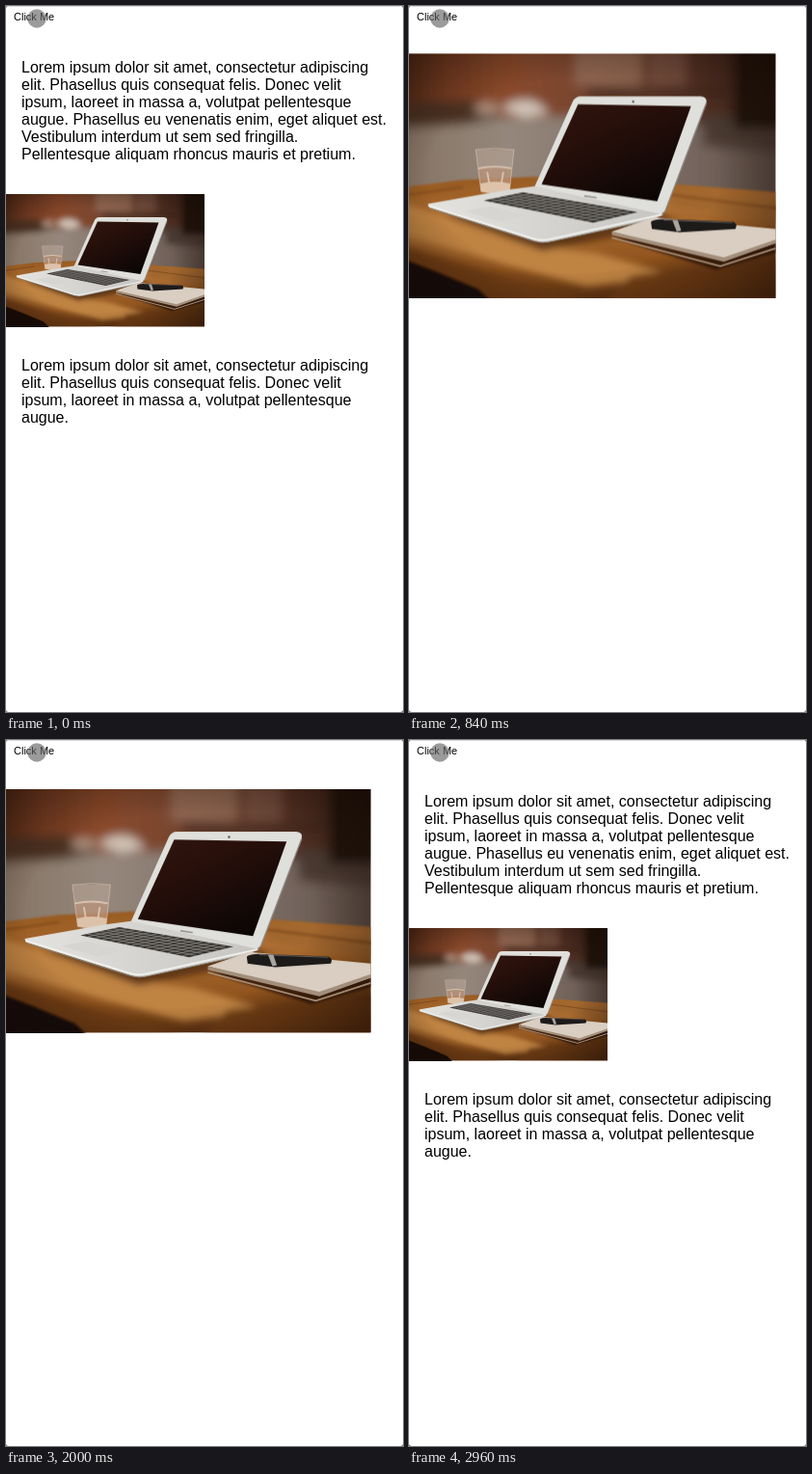
Write an HTML page that moves like this. It is 412 px wide and 732 px high and loops after 3000 ms.

```html
<!DOCTYPE html>
<html lang="en">
<head>
<meta charset="utf-8">
<title>Image transition</title>
<style>
html, body { margin: 0; width: 100%; height: 100%; overflow: hidden; background: #fff; }
svg { display: block; }
text { font: 16px "Liberation Sans", Arial, sans-serif; white-space: pre; }
.label { font-size: 11px; }
</style>
</head>
<body>
<svg width="412" height="732" viewBox="0 0 412 732">
  <defs>
    <filter id="soft" x="-10%" y="-10%" width="120%" height="120%"><feGaussianBlur stdDeviation="6"/></filter>
    <filter id="grain" x="-10%" y="-10%" width="120%" height="120%"><feGaussianBlur stdDeviation="4"/></filter>
    <filter id="fine" x="-10%" y="-10%" width="120%" height="120%"><feGaussianBlur stdDeviation="1.2"/></filter>
    <linearGradient id="wall">
      <stop offset="0" stop-color="#4a2817"/><stop offset=".15" stop-color="#7a3f24"/>
      <stop offset=".3" stop-color="#8a4a2c"/><stop offset=".5" stop-color="#744430"/>
      <stop offset=".8" stop-color="#553226"/><stop offset="1" stop-color="#241612"/>
    </linearGradient>
    <linearGradient id="street">
      <stop offset="0" stop-color="#82705f"/><stop offset=".3" stop-color="#95877c"/>
      <stop offset=".75" stop-color="#74655d"/><stop offset="1" stop-color="#54443c"/>
    </linearGradient>
    <linearGradient id="wood" x1="0" y1="0" x2=".2" y2="1">
      <stop offset="0" stop-color="#94571f"/><stop offset=".35" stop-color="#ad6f33"/>
      <stop offset=".65" stop-color="#935620"/><stop offset="1" stop-color="#532b0e"/>
    </linearGradient>
    <linearGradient id="screen" x1="0" y1="0" x2=".7" y2="1">
      <stop offset="0" stop-color="#301610"/><stop offset=".35" stop-color="#29100b"/>
      <stop offset="1" stop-color="#0b0605"/>
    </linearGradient>
    <linearGradient id="deck"><stop offset="0" stop-color="#e4e3df"/><stop offset="1" stop-color="#c6c5c1"/></linearGradient>
    <radialGradient id="vignette" cx=".45" cy=".5" r=".72">
      <stop offset=".55" stop-color="#140803" stop-opacity="0"/>
      <stop offset="1" stop-color="#140803" stop-opacity=".6"/>
    </radialGradient>
  </defs>

  <rect width="412" height="732" fill="#777"/>
  <rect width="412" height="732" rx="3" fill="#fff"/>
  <rect x="3" width="406" height="1" fill="#d9d9d9"/>

  <g id="texts"></g>

  <svg id="photo" viewBox="0 0 412 275" preserveAspectRatio="none">
    <g filter="url(#soft)">
      <rect x="-30" y="-30" width="472" height="130" fill="url(#wall)"/>
      <path d="M-30 76L200 70 442 88V200H-30Z" fill="url(#street)"/>
      <path d="M-30 56L70 52 104 72 60 80-30 84Z" fill="#4b3024"/>
      <path d="M104 62Q120 48 142 54L158 66 130 72Z" fill="#d2c4b8"/>
      <ellipse cx="88" cy="62" rx="14" ry="7" fill="#a98b79"/>
      <path d="M186 -10H262V36H186Z" fill="#8c6450"/>
      <path d="M200 38H360V50H200Z" fill="#4c2d22"/>
      <path d="M270 -10H312V36H270Z" fill="#785140"/>
      <path d="M330 66L430 78V112L330 104Z" fill="#4d3d36"/>
      <rect x="366" y="-20" width="70" height="104" fill="#211511"/>
    </g>
    <g filter="url(#fine)">
      <path d="M-20 152L60 142 150 138 300 147 432 157V300H-20Z" fill="url(#wood)"/>
    </g>
    <g filter="url(#grain)">
      <path d="M-20 165L30 180 140 216 210 224 300 250 200 262 110 238-20 200Z" fill="#bf8342"/>
      <path d="M300 152L430 170V190L296 172Z" fill="#a0662d"/>
      <path d="M-20 212L60 236 130 258 240 290H-20Z" fill="#754016"/>
      <path d="M250 250L430 226V300H200Z" fill="#744014"/>
      <path d="M40 182L150 222 240 204 300 186 270 178Z" fill="#4f2a12" opacity=".8"/>
    </g>
    <g filter="url(#fine)">
      <path d="M-20 226L30 245 78 265 104 290H-20Z" fill="#170c08"/>
      <path d="M290 158L430 176M-10 160L60 150" stroke="#6f3e18" stroke-width="2" opacity=".6"/>
      <path d="M230 207L345 243 412 224V212Z" fill="#43230f"/>
    </g>
    <rect width="412" height="275" fill="url(#vignette)"/>

    <path d="M75 108H118L113 155Q97 159 81 155Z" fill="#d8c2b4" opacity=".3"/>
    <path d="M77 128Q97 124 116 128L113 155Q97 159 81 155Z" fill="#b58e74" opacity=".65"/>
    <path d="M80 146Q97 142 114 146L113 154Q97 158 81 155Z" fill="#f0dcc8" opacity=".7"/>
    <path d="M75 108Q97 105 118 108L113 155Q97 159 81 155Z" fill="none" stroke="#e0cabb" opacity=".6"/>
    <path d="M78 129Q97 125 115 129M88 133L90 145M106 133L104 145" fill="none" stroke="#f5e4d6" stroke-width="2" opacity=".6"/>

    <path d="M141 150L184 54Q187 48 193 48L328 48Q336 49 334 56L288 177 283 182Z" fill="#dfdfdb"/>
    <path d="M334 56L288 177 283 182" fill="none" stroke="#8c8682" stroke-width="1.5"/>
    <path d="M190 57L317 59 279 166 149 147Z" fill="url(#screen)"/>
    <circle cx="252" cy="54" r="1.3" fill="#555"/>
    <path d="M197 160L211 162" stroke="#8c8a87" stroke-width="1.5"/>
    <path d="M21 169L112 153 141 149 286 181 272 187 161 211Q150 214 140 210L23 173Z" fill="url(#deck)"/>
    <path d="M22 171L140 208Q150 211 161 208L284 181" fill="none" stroke="#f1f1ed" stroke-width="2"/>
    <path d="M24 174L140 211Q150 214 161 211L280 185" fill="none" stroke="#85817b"/>
    <path d="M63 177L92 172 133 182 103 189Z" fill="#d6d5d1"/>
    <path d="M84 165L128 156 257 178 207 190Z" fill="#35322f"/>
    <path id="keys" fill="none" stroke="#aaa8a3" stroke-width=".6"/>

    <path d="M228 200L275 184 412 197V213L354 233Z" fill="#d9cec1"/>
    <path d="M228 200L354 229 412 209V213L354 234 228 204Z" fill="#a28e7b"/>
    <path d="M228 207L350 239 412 219" fill="none" stroke="#a98f76" stroke-width="2"/>
    <path d="M272 189Q276 186 286 186L364 189Q370 191 367 197L304 201 273 197Z" fill="#1d1a1a"/>
    <path d="M286 187L364 190" stroke="#66605b"/>
    <path d="M296 187L302 187 306 199 301 200Z" fill="#aaa49e"/>
  </svg>

  <text class="label" x="8" y="15">Click Me</text>
  <circle id="touch" cx="32" cy="13" r="9.7" fill="#666" fill-opacity=".65"/>
  <g id="press">
    <circle cx="32" cy="12.5" r="22" fill="none" stroke="#111" stroke-width="1.8"/>
    <path d="M32 12V26.5L35.2 23.5 37.6 29 40 28 37.6 22.6H42Z" fill="#000" stroke="#fff"/>
  </g>
</svg>

<script>
const LOOP = 3000, STEP = 250;
const $ = id => document.getElementById(id);

const lines = [
  'Lorem ipsum dolor sit amet, consectetur adipiscing',
  'elit. Phasellus quis consequat felis. Donec velit',
  'ipsum, laoreet in massa a, volutpat pellentesque',
  'augue. Phasellus eu venenatis enim, eget aliquet est.',
  'Vestibulum interdum ut sem sed fringilla.',
  'Pellentesque aliquam rhoncus mauris et pretium.',
  'Pellentesque vehicula malesuada risus, ut laoreet',
  'lectus dignissim vel. Suspendisse vel ex id tortor',
  'tincidunt rhoncus. In tempor commodo sapien',
  'placerat auctor. Maecenas sollicitudin augue massa.',
  'Quisque facilisis dui quis risus tempor euismod',
  'pharetra ut leo. Fusce sit amet dui at nisi facilisis',
  'lobortis ut ut est. Morbi a arcu eget nibh aliquam',
  'maximus sed quis ex.'
];

const paragraph = (top, rows) => rows.map((row, i) =>
  `<text x="16" y="${top + 14 + 18 * i}">${row}</text>`).join('');

$('texts').innerHTML =
  `<g id="compact">${paragraph(55, lines.slice(0, 6))}${paragraph(364, [...lines.slice(0, 3), 'augue.'])}</g>` +
  `<g id="expanded">${paragraph(330, lines)}</g>`;

// Gaps between the keys, spread over the keyboard's four corners
const keyPoint = (u, v) => {
  const x = 84 + 44 * v + u * (123 + 6 * v);
  const y = 165 - 9 * v + u * (25 - 3 * v);
  return x.toFixed(1) + ' ' + y.toFixed(1);
};
let grid = '';
for (let i = 1; i < 6; i++) grid += `M${keyPoint(0, i / 6)}L${keyPoint(1, i / 6)}`;
for (let i = 1; i < 15; i++) grid += `M${keyPoint(i / 15, 0)}L${keyPoint(i / 15, 1)}`;
$('keys').setAttribute('d', grid);

const bezier = (x1, y1, x2, y2) => x => {
  if (x <= 0 || x >= 1) return x <= 0 ? 0 : 1;
  const at = (a, b, s) => 3 * a * s * (1 - s) ** 2 + 3 * b * s * s * (1 - s) + s ** 3;
  let lo = 0, hi = 1;
  for (let i = 0; i < 24; i++) {
    const mid = (lo + hi) / 2;
    if (at(x1, x2, mid) < x) lo = mid; else hi = mid;
  }
  return at(y1, y2, lo);
};
const ease = bezier(.25, .1, .25, 1);
const easeInOut = bezier(.42, 0, .58, 1);

function draw(t) {
  const phase = (start, curve) => curve((t - start) / STEP);
  const grow = phase(659, easeInOut) - phase(1931, easeInOut);
  const width = 206 * (1 + grow);
  const photo = $('photo');
  photo.setAttribute('y', 195 - 172 * grow);
  photo.setAttribute('width', width);
  photo.setAttribute('height', width * 2 / 3);

  $('compact').setAttribute('opacity', 1 - phase(402, ease) + phase(2186, ease));
  $('expanded').setAttribute('opacity', phase(912, ease) - phase(1670, ease));

  const pressed = (t >= 240 && t < 400) || (t >= 1510 && t < 1660);
  $('press').setAttribute('visibility', pressed ? 'visible' : 'hidden');
  $('touch').setAttribute('visibility', pressed ? 'hidden' : 'visible');
}

const begin = performance.now();
function tick() {
  draw((performance.now() - begin) % LOOP);
  requestAnimationFrame(tick);
}
tick();
</script>
</body>
</html>
```
